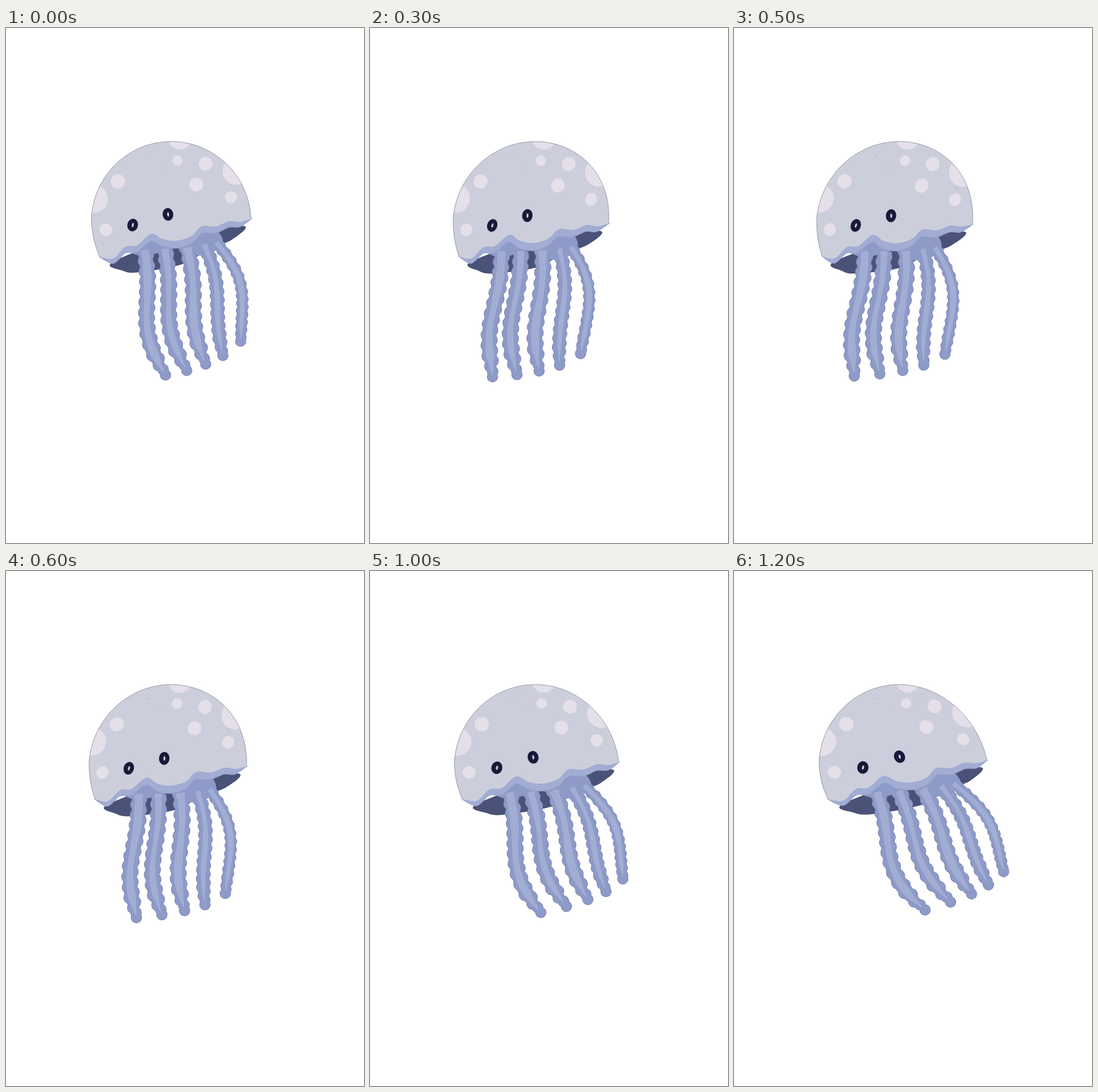
Write an HTML page with a canvas that moves like this. It is 624 px wide and 898 px high and loops after 1.3 s.

```html
<!DOCTYPE html>
<html lang="en">
<head>
<meta charset="utf-8">
<title>Jellyfish</title>
<style>
html, body { margin: 0; width: 100%; height: 100%; overflow: hidden; background: #fff; }
canvas { display: block; }
</style>
</head>
<body>
<canvas id="stage" width="624" height="898"></canvas>
<script>
const ctx = document.getElementById('stage').getContext('2d');
const STEP = 100, STEPS = 13, TURN = 4;
const INK = '#171a38', GREY = '#cccedb', PALE = '#e4dfe9', DEEP = '#4a5278',
      BLUE = '#8e9ac7', LIGHT = '#a2add4', EDGE = '#6b75a6';

// Each swing end: offsets at the left, middle and right,
// for the bell (x, y) and for the arm tips (x, y)
const REST = [[0, 0, 0], [0, 0, 0], [0, 0, 0], [0, 0, 0]];
const BACK = [[-11, -22, -27], [-1, 6.5, 20], [-86, -71, -56], [4, 16, 29]];
const FORE = [[0.5, 13.5, 25], [-1.2, -2.5, -5], [55, 66, 61], [-14, -23, -22]];

const HEM = [[427, 333], [408, 338], [389, 337], [366, 346], [341, 346], [323, 363],
  [297, 371], [273, 368], [253, 359], [229, 379], [208, 382], [187, 402], [163, 399]];
const UNDER = [[186, 408], [203, 423], [232, 426], [310, 411], [352, 386], [394, 369],
  [413, 345], [300, 365]];
const INNER = [[210, 383], [242, 398], [294, 384], [335, 397], [377, 380], [362, 352],
  [300, 372], [253, 362]];
const DOTS = [[303, 191, 21], [153, 298, 24.5], [402, 249, 24.5], [299, 231, 9],
  [348, 236.5, 12], [331.5, 273, 12], [392, 295, 10.5], [195, 267.5, 12.5], [174, 352, 11]];
const EYES = [[220.7, 343.6, 0.2], [282.3, 325, -0.12]];

const arm = (width, root, tip) => ({ width, root, tip });
const ARMS = [
  arm(14.5, [242, 388], [278, 605]),
  arm(14.5, [277, 386], [315, 597]),
  arm(14.5, [316, 383], [348, 586]),
  arm(12.5, [346, 378], [378, 571]),
  arm(10.5, [367, 374], [409, 546])
];

const mix = (a, b, t) => a + (b - a) * t;
const parabola = (q, [l, m, r]) =>
  l + (4 * m - 3 * l - r) * q + 2 * (l - 2 * m + r) * q * q;

// Short swing back from rest, then one long swing forward
function poseAt(step) {
  const early = step <= TURN;
  const [from, to] = early ? [REST, BACK] : [BACK, FORE];
  const t = early ? step / TURN : (step - TURN) / (STEPS - 1 - TURN);
  return from.map((row, i) => row.map((v, k) => mix(v, to[i][k], t)));
}

// The bell is pinned at its crown and bends more towards the hem
function shift(pose, [x, y]) {
  const v = Math.pow(Math.max(0, y - 198) / 200, 1.5), q = (x - 164) / 263;
  return [v * parabola(q, pose[0]), v * parabola(q, pose[1])];
}

function warp(pose, pt) {
  const d = shift(pose, pt);
  return [pt[0] + d[0], pt[1] + d[1]];
}

function curve(pts, closed, joined) {
  const n = pts.length;
  const at = i => closed ? pts[(i + n) % n] : pts[Math.max(0, Math.min(n - 1, i))];
  if (!joined) ctx.moveTo(...pts[0]);
  for (let i = 0; i < (closed ? n : n - 1); i++) {
    const [a, b, c, d] = [at(i - 1), at(i), at(i + 1), at(i + 2)];
    ctx.bezierCurveTo(b[0] + (c[0] - a[0]) / 6, b[1] + (c[1] - a[1]) / 6,
      c[0] - (d[0] - b[0]) / 6, c[1] - (d[1] - b[1]) / 6, c[0], c[1]);
  }
}

function blob(pts, color) {
  ctx.beginPath();
  curve(pts, true);
  ctx.fillStyle = color;
  ctx.fill();
}

function oval(pose, x, y, rx, ry, tilt, color) {
  const pts = [], c = Math.cos(tilt), s = Math.sin(tilt);
  for (let i = 0; i < 16; i++) {
    const a = i * Math.PI / 8, u = rx * Math.cos(a), v = ry * Math.sin(a);
    pts.push(warp(pose, [x + u * c - v * s, y + u * s + v * c]));
  }
  blob(pts, color);
}

function domeLine(pose) {
  const pts = [[163, 399], [153.5, 370]];
  for (let i = 0; i <= 20; i++) {
    const a = Math.PI * (1 + i / 20);
    pts.push([288 + 139 * Math.cos(a), 337.5 + 139.5 * Math.sin(a)]);
  }
  pts[pts.length - 1] = HEM[0];
  return pts.map(pt => warp(pose, pt));
}

// Returns the centre line of an arm as a function of 0 (root) to 1 (tip)
function armLine(pose, { root, tip }, index) {
  const q = index / (ARMS.length - 1);
  const top = shift(pose, root);
  const end = [parabola(q, pose[2]), parabola(q, pose[3])];
  const lag = 0.28 * (1 - q) ** 4;
  return s => {
    const h = s - lag * (s - s ** 5);
    const bow = (38 * q * q - 15) * Math.sin(Math.PI * s) +
                (6.5 - 3 * q) * Math.sin(2 * Math.PI * s);
    return [0, 1].map(k =>
      mix(root[k], tip[k], s) + mix(top[k], end[k], h) + (k ? 0 : bow));
  };
}

function beside(line, s, d) {
  const a = line(s - 0.01), b = line(s + 0.01), c = line(s);
  const dx = b[0] - a[0], dy = b[1] - a[1], l = Math.hypot(dx, dy);
  return [c[0] + dy / l * d, c[1] - dx / l * d];
}

function ribbon(line, half, color) {
  const left = [], right = [];
  for (let i = 0; i <= 24; i++) {
    const s = i / 24 * 0.97, d = half(s);
    left.push(beside(line, s, d));
    right.unshift(beside(line, s, -d));
  }
  blob(left.concat(right), color);
}

function drawArm(pose, part, index) {
  const w = part.width, line = armLine(pose, part, index);
  const n = Math.round((part.tip[1] - part.root[1]) * 1.04 / (w * 1.28));
  const bumps = [];
  for (let i = 0; i <= 2 * n; i++) {
    const s = i / (2 * n), end = Math.max(0, (s - 0.85) / 0.15);
    const side = (i % 2 ? 1 : -1) * w * 0.28 * (1 - end);
    bumps.push([...beside(line, s, side), mix(w * 0.72, 9.3, end)]);
  }
  for (const [grow, color] of [[0.4, EDGE], [-0.3, BLUE]]) {
    ctx.beginPath();
    for (const [x, y, r] of bumps) {
      ctx.moveTo(x + r + grow, y);
      ctx.arc(x, y, r + grow, 0, 7);
    }
    ctx.fillStyle = color;
    ctx.fill();
    ribbon(line, s => Math.min(w * 0.82, 5 + (1 - s) * 40) + grow, color);
  }
}

function drawStripe(pose, part, index) {
  const thick = part.width * (index % 2 ? 0.34 : 0.43);
  ribbon(armLine(pose, part, index), s =>
    thick * (1 + 0.15 * Math.sin(s * 9 + index)) * Math.min(1, (1 - s) * 6), LIGHT);
}

function mark(pose, x, y, dx, dy) {
  ctx.beginPath();
  ctx.moveTo(...warp(pose, [x, y]));
  ctx.lineTo(...warp(pose, [x + dx, y + dy]));
  ctx.strokeStyle = '#b8bac9';
  ctx.lineWidth = 1.2;
  ctx.stroke();
}

function draw(pose) {
  const bend = list => list.map(pt => warp(pose, pt));
  ctx.fillStyle = '#fff';
  ctx.fillRect(0, 0, 624, 898);

  blob(bend(UNDER), DEEP);
  ARMS.forEach((part, i) => drawArm(pose, part, i));
  blob(bend(INNER), BLUE);
  ARMS.forEach((part, i) => drawStripe(pose, part, i));

  const hem = bend(HEM), dome = domeLine(pose), last = HEM.length - 1;
  const frill = HEM.map(([x, y], i) =>
    [x, y + 12.5 * Math.sin(Math.PI * i / last) ** 0.3]).reverse();
  ctx.beginPath();
  curve(bend(frill));
  curve(hem, false, true);
  ctx.closePath();
  ctx.fillStyle = LIGHT;
  ctx.fill();
  ctx.lineWidth = 1.5;
  ctx.strokeStyle = '#99a5cf';
  ctx.stroke();

  ctx.save();
  ctx.beginPath();
  curve(dome);
  curve(hem, false, true);
  ctx.closePath();
  ctx.fillStyle = GREY;
  ctx.fill();
  ctx.clip();
  for (const [x, y, r] of DOTS) oval(pose, x, y, r, r, 0, PALE);
  mark(pose, 246, 223, 5, -1);
  mark(pose, 269, 244, 2, -1);
  mark(pose, 391, 273, 3, 3);
  ctx.restore();

  ctx.beginPath();
  curve(dome);
  ctx.lineWidth = 0.9;
  ctx.strokeStyle = '#8b8e9f';
  ctx.stroke();

  for (const [x, y, tilt] of EYES) {
    oval(pose, x, y, 9.2, 11, tilt, INK);
    oval(pose, x + 0.3, y, 1.7, 3.8, tilt, '#c9cde4');
  }
}

let shown = -1;
const start = performance.now();
function tick() {
  const step = Math.floor((performance.now() - start) / STEP) % STEPS;
  if (step !== shown) draw(poseAt(shown = step));
  requestAnimationFrame(tick);
}
tick();
</script>
</body>
</html>
```
